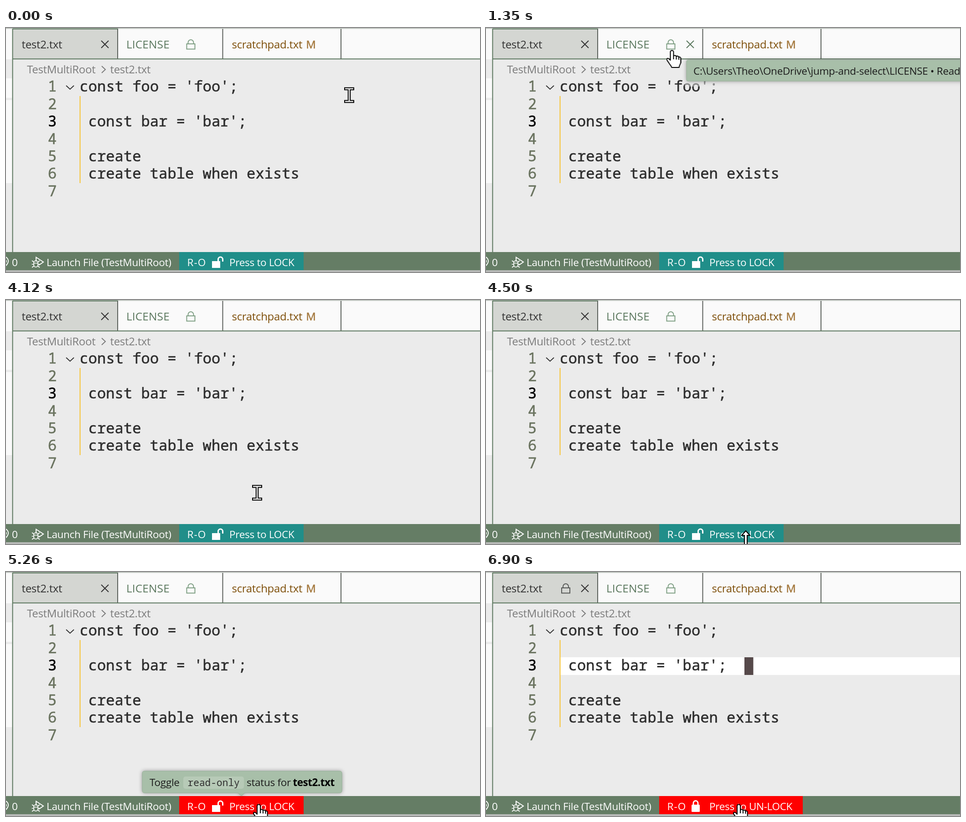
These frames come from a looping animation (1040 by 538 pixels, 8 s). An HTML page:

```html
<!DOCTYPE html>
<html lang="en">
<head>
<meta charset="utf-8">
<title>Read-only toggle</title>
<style>
html, body { margin: 0; width: 100%; height: 100%; overflow: hidden; background: #ebebeb; }
svg { display: block; width: 100%; height: 100%; }
text { white-space: pre; }
.ui { font: 24px "Open Sans", "Noto Sans", sans-serif; letter-spacing: -.3px; }
.small { font-size: 22.5px; }
.code { font: 32px "Noto Sans Mono", "DejaVu Sans Mono", monospace; letter-spacing: .1px; fill: #2e2e2e; stroke: #2e2e2e; stroke-width: .6; }
.nums { fill: #6a735f; stroke: #6a735f; }
.line { fill: none; stroke: currentColor; stroke-width: 2; }
.shadow { filter: drop-shadow(0 0 4px rgba(0, 0, 0, .35)); }

/* Every change is hard: one loop, held steps */
.anim { animation: 8s step-end -4ms infinite; }
.pointer { animation-name: pointer; }
.hand { animation-name: hand; }
.beam { animation-name: beam; }
.resize { animation-name: resize; }
.pad-hover { animation-name: pad-hover; }
.pad-tip { animation-name: pad-tip; }
.license-hover { animation-name: license-hover; }
.license-tip { animation-name: license-tip; }
.hot { animation-name: hot; }
.toggle-tip { animation-name: toggle-tip; }
.unlocked { animation-name: unlocked; }
.locked { animation-name: locked; }
.focus { animation-name: focus; }

@keyframes pointer {
  0% { transform: translate(753px, 148px); }
  6% { transform: translate(745px, 149px); }
  7.5% { transform: translate(655px, 140px); }
  9.125% { transform: translate(585px, 54px); }
  10.625% { transform: translate(535px, 42px); }
  12.25% { transform: translate(482px, 56px); }
  13.75% { transform: translate(418.5px, 67.5px); }
  15.375% { transform: translate(412px, 56px); }
  16.875% { transform: translate(407.5px, 49px); }
  45.25% { transform: translate(406.5px, 49px); }
  46.875% { transform: translate(405px, 180px); }
  48.5% { transform: translate(480px, 335px); }
  50% { transform: translate(551px, 425px); }
  51.625% { transform: translate(559px, 506px); }
  53.125% { transform: translate(562px, 509px); }
  54.75% { transform: translate(566px, 511px); }
  56.25% { transform: translate(570px, 508px); }
  57.875% { transform: translate(564px, 513px); }
  59.375% { transform: translate(560px, 511px); }
  61% { transform: translate(558px, 511px); }
  64.125% { transform: translate(556px, 512px); }
  65.75% { transform: translate(554px, 512px); }
}
@keyframes hand {
  0% { opacity: 0; } 9.125% { opacity: 1; }
  46.875% { opacity: 0; } 51.625% { opacity: 1; }
  56.25% { opacity: 0; } 57.875% { opacity: 1; }
}
@keyframes beam {
  0% { opacity: 1; } 9.125% { opacity: 0; }
  46.875% { opacity: 1; } 51.625% { opacity: 0; }
}
@keyframes resize { 0% { opacity: 0; } 56.25% { opacity: 1; } 57.875% { opacity: 0; } }
@keyframes pad-hover { 0% { opacity: 0; } 9.125% { opacity: 1; } 13.75% { opacity: 0; } }
@keyframes pad-tip { 0% { opacity: 0; } 10.625% { opacity: 1; } 13.75% { opacity: 0; } }
@keyframes license-hover { 0% { opacity: 0; } 13.75% { opacity: 1; } 46.875% { opacity: 0; } }
@keyframes license-tip { 0% { opacity: 0; } 16.875% { opacity: 1; } 46.875% { opacity: 0; } }
@keyframes hot {
  0% { fill: #208e89; } 51.625% { fill: #f00; }
  56.25% { fill: #208e89; } 57.875% { fill: #f00; }
}
@keyframes toggle-tip {
  0% { opacity: 0; } 53.125% { opacity: 1; } 56.25% { opacity: 0; }
  61% { opacity: 1; } 83% { opacity: 0; }
}
@keyframes unlocked { 0% { opacity: 1; } 84.625% { opacity: 0; } }
@keyframes locked { 0% { opacity: 0; } 84.625% { opacity: 1; } }
@keyframes focus { 0% { opacity: 0; } 86.25% { opacity: 1; } }
</style>
</head>
<body>
<svg viewBox="0 0 1040 538">
  <defs>
    <path id="close" class="line" d="M-8-8 8 8M8-8-8 8"/>
    <path id="lock" class="line" d="M-9-1H9V10.500H-9zM-6-1V-4a6 6 0 0 1 12 0V-1"/>
  </defs>

  <!-- Side bar edge -->
  <rect width="1040" height="538" fill="#ebebeb"/>
  <path fill="#fafafa" d="M0 2H14V69H0zM0 111H14V154H0zM0 159H14V342H0z"/>

  <!-- Tabs -->
  <rect x="15" y="2" width="1025" height="66" fill="#fafafa"/>
  <rect x="15" y="2" width="230" height="66" fill="#d4d6d2"/>
  <rect width="1040" height="2" fill="#c3c9c3"/>
  <path d="M14 2H246" stroke="#5c775f" stroke-width="2"/>
  <path d="M245 2V68M475.500 2V68M735 2V68" stroke="#5c615c" stroke-width="2"/>
  <path d="M14.500 2V494M14 68.200H1040" stroke="#5c775f" stroke-width="2"/>
  <g class="ui">
    <text x="34.500" y="45" fill="#333">test2.txt</text>
    <text x="264" y="45" fill="#5a775d" style="font-size:24.5px;letter-spacing:.1px">LICENSE</text>
    <text x="495.500" y="45" fill="#7d4e08">scratchpad.txt</text>
    <text x="658.500" y="45" fill="#a57a40" stroke="#a57a40" stroke-width=".6" style="font-size:23.5px">M</text>
    <text x="46" y="100" fill="#7c7c7c">TestMultiRoot</text>
    <text x="228.500" y="100" fill="#7c7c7c">test2.txt</text>
  </g>
  <path class="line" color="#7c7c7c" d="M210 84l8 7.500-8 7.500"/>
  <use href="#close" x="217" y="36" color="#333"/>
  <use href="#lock" x="405.500" y="36" color="#7f9f84"/>
  <g class="anim locked"><use href="#lock" x="175" y="36" color="#575957"/></g>
  <g class="anim license-hover"><use href="#close" x="448" y="36" color="#5a775d"/></g>
  <g class="anim pad-hover"><use href="#close" x="707" y="36" color="#7d4e08"/></g>

  <!-- Editor -->
  <g class="anim focus">
    <rect x="163" y="188" width="877" height="39" fill="#fff"/>
    <rect x="567" y="188" width="19.500" height="39" fill="#56494a"/>
  </g>
  <path d="M162.500 150V342" stroke="#f7c331" stroke-width="2"/>
  <path class="line" color="#333" d="M132 127l8.500 8 8.500-8"/>
  <g class="code nums">
    <text x="92" y="140.400">1</text>
    <text x="92" y="178.800">2</text>
    <text x="92" y="217.200" fill="#000" stroke="#000">3</text>
    <text x="92" y="255.600">4</text>
    <text x="92" y="294">5</text>
    <text x="92" y="332.400">6</text>
    <text x="92" y="370.800">7</text>
  </g>
  <g class="code">
    <text x="161.500" y="140.400">const foo = 'foo';</text>
    <text x="180.700" y="217.200">const bar = 'bar';</text>
    <text x="180.700" y="294">create</text>
    <text x="180.700" y="332.400">create table when exists</text>
  </g>

  <!-- Status bar -->
  <rect y="494" width="1040" height="40" fill="#657d65"/>
  <rect y="534" width="1040" height="4" fill="#b8bab8"/>
  <rect class="anim hot" x="380" y="494" width="273" height="40" fill="#208e89"/>
  <g class="anim locked"><rect x="652" y="494" width="43" height="40" fill="#f00"/></g>
  <g class="line" color="#fff">
    <path d="M0 505q10 8 0 19M-3 509q7 5 0 11"/>
    <path d="M66 515V505.500L82 516 72 523"/>
    <path d="M61 517.500a4.500 4.500 0 0 1 9 0v5a4.500 4.500 0 0 1-9 0zM61 518.500H70M57 513l4 3M74 513l-4 3M56.500 521H61M70 521h4.500M57 528l4-3M74 528l-4-3" stroke-width="1.7"/>
  </g>
  <g class="ui small" fill="#fff">
    <text x="13" y="525">0</text>
    <text x="89" y="525">Launch File (TestMultiRoot)</text>
    <text x="397.500" y="525" style="letter-spacing:1px">R-O</text>
    <text class="anim unlocked" x="490" y="525">Press to LOCK</text>
    <text class="anim locked" x="490" y="525">Press to UN-LOCK</text>
  </g>
  <g class="anim unlocked">
    <path fill="#fff" d="M452 514H470V529H452z"/>
    <path fill="none" stroke="#fff" stroke-width="3" d="M465.500 515V510a5 5 0 0 1 10 0V515"/>
  </g>
  <g class="anim locked">
    <rect x="451" y="513" width="18" height="16" rx="1.500" fill="#fff"/>
    <path fill="none" stroke="#fff" stroke-width="3" d="M455 514V509.500a5 5 0 0 1 10 0V514"/>
  </g>

  <!-- Tooltips -->
  <g class="anim pad-tip">
    <rect class="shadow" x="530" y="71" width="530" height="46" rx="3" fill="#a8bfa9" stroke="#96b098"/>
    <text class="ui small" x="546" y="103" fill="#1c1c1c">C:\Users\Theo\TestMultiRoot\scratchpad.txt • Modified</text>
  </g>
  <g class="anim license-tip">
    <rect x="436" y="117" width="604" height="12" fill="#e8e8e8" opacity=".5"/>
    <rect class="shadow" x="440" y="71" width="620" height="46" rx="3" fill="#a8bfa9" stroke="#96b098"/>
    <text class="ui small" x="455" y="103" fill="#1c1c1c">C:\Users\Theo\OneDrive\jump-and-select\LICENSE • Read-only</text>
  </g>
  <g class="anim toggle-tip">
    <path class="shadow" fill="#a8bfa9" stroke="#96b098" d="M304 439H732q5 0 5 5V482q0 5-5 5H524l-7.500 7-7.500-7H304q-5 0-5-5V444q0-5 5-5z"/>
    <rect x="389" y="451" width="133" height="27" rx="5" fill="#b7cab7"/>
    <g class="ui small" fill="#1c1c1c">
      <text x="315" y="472">Toggle</text>
      <text x="528" y="472">status for</text>
      <text x="629.500" y="472" fill="#000" style="font-weight:700;letter-spacing:-.5px">test2.txt</text>
    </g>
    <text class="code" x="398.500" y="472" style="font-size:21px;stroke:none">read-only</text>
  </g>

  <!-- Mouse pointer -->
  <g class="anim pointer">
    <g class="anim beam" fill="none">
      <path d="M-11-14H11M-11 14H11M0-14V14" stroke="#000" stroke-width="6.500"/>
      <path d="M-9-14H9M-9 14H9M0-14V14" stroke="#f2f2f2" stroke-width="2.500"/>
    </g>
    <g class="anim hand" stroke="#000" stroke-width="2" stroke-linejoin="round">
      <path fill="#fff" d="M-3 22V4a3.500 3.500 0 0 1 7 0V13c1-2 5-2 6 .7 2-1.800 4.800-.6 5.400 1.400 2.200-1 4.300.4 4.300 3V27c0 4-3.500 6-3.500 11H0c-1-4-4-6-6-9.500S-11 22-11 20.500c0-3.500 4-3 5.500-1z"/>
      <path d="M4 12v8M10 13.500v7M15.400 15v6"/>
    </g>
    <path class="anim resize" fill="#fff" stroke="#000" stroke-width="2" d="M0 1 9 11H3V40H-3V11H-9z"/>
  </g>
</svg>
</body>
</html>
```
